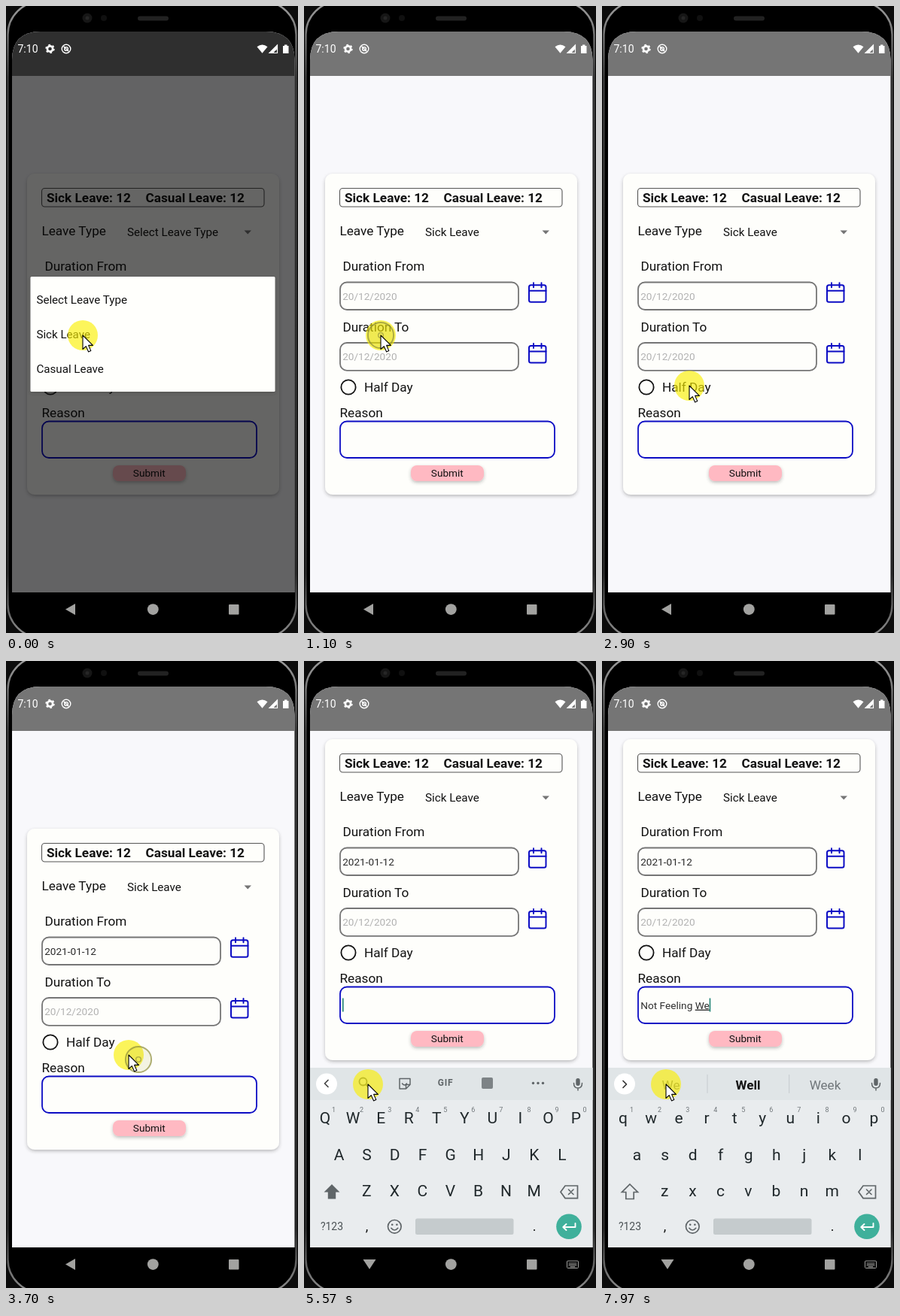
Animation, 388 px wide and 834 px high, one loop 8 s. Source, as an HTML page:

```html
<!DOCTYPE html>
<html lang="en">
<head>
<meta charset="utf-8">
<title>Leave request form</title>
<style>
html, body { margin: 0; width: 100%; height: 100%; overflow: hidden; background: #000; }
svg { display: block; width: 388px; height: 834px; }
text { font-family: Roboto, Arial, sans-serif; white-space: pre; fill: #121212; }
.mid { text-anchor: middle; }
.line { fill: none; stroke-linecap: round; stroke-linejoin: round; }
</style>
</head>
<body>
<svg id="stage" viewBox="0 0 388 834"></svg>
<script>
const LOOP = 8000;
const SHIFT = -119;
const GRAY = '#757575', BLUE = '#0c0cc4', KEY = '#20282b', ICON = '#5f6568', NAV = '#a2a2a0', HINT = '#70767a';

// ---- markup helpers ----
const text = (x, y, size, str, more = '') =>
  `<text x="${x}" y="${y}" font-size="${size}" ${more}>${str}</text>`;
const mid = (x, y, size, str, more = '') => text(x, y, size, str, 'class="mid" ' + more);
const box = (x, y, w, h, r, more) =>
  `<rect x="${x}" y="${y}" width="${w}" height="${h}" rx="${r}" ${more}/>`;
const dot = (x, y, r, more) => `<circle cx="${x}" cy="${y}" r="${r}" ${more}/>`;
const fill = c => `fill="${c}"`;
const ink = c => `style="fill:${c}"`;
const line = (c, w) => `fill="none" stroke="${c}" stroke-width="${w}"`;
const path = (d, more) => `<path d="${d}" ${more}/>`;
const stroke = (d, c, w) => path(d, `class="line" stroke="${c}" stroke-width="${w}"`);
const group = (id, body, more = '') => `<g id="${id}" ${more}>${body}</g>`;

// ---- parts ----
const defs = () => `<defs>
  <filter id="soft" x="-20%" y="-20%" width="140%" height="150%">
    <feDropShadow dx="0" dy="2" stdDeviation="2.2" flood-color="#303030" flood-opacity=".32"/></filter>
  <linearGradient id="rim" x2="0" y2="1">
    <stop stop-color="#a0a0a0"/><stop offset=".12" stop-color="#3c3c3c"/>
    <stop offset=".9" stop-color="#2c2c2c"/><stop offset="1" stop-color="#909090"/></linearGradient>
  <clipPath id="screen"><path d="M8 780V72Q8 34 46 34H345Q383.5 34 383.5 72V780Z"/></clipPath></defs>`;

const phone = () =>
  box(0, 0, 388, 834, 0, fill('#0c0c0c')) +
  box(2.5, -6, 383, 846, 44, 'fill="#000" stroke="url(#rim)" stroke-width="2.4"') +
  box(175, 13.5, 41, 6, 3, fill('#222')) +
  dot(108, 16, 6.5, fill('#161616')) + dot(108, 16, 2.5, fill('#262626')) +
  dot(130, 16, 4, fill('#101010'));

const calendar = y =>
  box(299, y + 3, 22.5, 22.5, 2.5, line(BLUE, 2)) +
  stroke(`M299 ${y + 10.5}H321.5M305 ${y}v6M315.5 ${y}v6`, BLUE, 2);

const card = () =>
  box(28, 223, 335, 427, 10, 'fill="#fefefb" filter="url(#soft)"') +
  box(47.5, 242.5, 295.5, 24.5, 4, line('#555', 1.1)) +
  text(54, 261, 17.2, 'Sick Leave: 12', 'font-weight="700"') +
  text(185.5, 261, 17.2, 'Casual Leave: 12', 'font-weight="700"') +
  text(47.5, 304.8, 17.2, 'Leave Type') +
  text(161, 306.4, 15.2, '', 'id="type"') +
  path('M316.5 298.5h9.5l-4.75 5z', fill(GRAY)) +
  text(51.5, 352, 17.2, 'Duration From') +
  box(48, 367.5, 237, 36.5, 9, line(GRAY, 1.8)) +
  text(51.2, 390.8, 13.6, '', 'id="from"') + calendar(368.2) +
  text(51.5, 432.8, 17.2, 'Duration To') +
  box(48, 448, 237, 36.8, 9, line(GRAY, 1.8)) +
  text(51.2, 471.4, 13.6, '20/12/2020', ink('#b2b2b2')) + calendar(448.9) +
  dot(59, 507, 9.6, line('#121212', 1.8)) +
  text(80, 513.2, 17.2, 'Half Day') +
  text(47.5, 546.8, 17.2, 'Reason') +
  box(48, 552.5, 285, 48.5, 9, line(BLUE, 1.8)) +
  text(51.2, 581.6, 13.66, '<tspan id="done"></tspan><tspan id="word" text-decoration="underline"></tspan>',
    'id="reason" ' + ink('#303030')) +
  box(0, 567.5, 1.6, 18, 0, 'id="caret" fill="#1f8273"') +
  box(142, 611, 97, 21, 8, 'fill="#ffb9c2" filter="url(#soft)"') +
  mid(190.3, 626.2, 13.6, 'Submit');

const status = () =>
  text(15.5, 62.4, 14, '7:10', ink('#fff')) +
  dot(58.5, 57, 3.6, line('#fff', 2.6)) +
  dot(58.5, 57, 5.4, line('#fff', 1.6) + ' stroke-dasharray="2.6 3.05"') +
  dot(80, 57, 5.8, line('#fff', 1.4)) + dot(80, 57, 2.4, line('#fff', 1.4)) +
  stroke('M77 54l6 6', '#fff', 1.2) +
  path('M333.5 54.2q7-5.4 14 0l-7 8.6z', fill('#fff')) +
  path('M360.5 52v10.5h-10.5z', line('#fff', 1.2)) +
  path('M360.5 52v5l-5.5 5.5h-5z', fill('#fff')) +
  path('M368 53h2v-1.5h3.5V53h2v10h-7.5z', fill('#fff'));

const dialog = () =>
  box(32.5, 360, 325, 153, 1.5, 'fill="#fffffc" filter="url(#soft)"') +
  ['Select Leave Type', 'Sick Leave', 'Casual Leave']
    .map((s, i) => text(40.4, 396.4 + 45.9 * i, 15.15, s)).join('');

const nav = () =>
  group('back', path('M79 802.5l13-7.5v15z', fill(NAV))) +
  group('hide', path('M78.5 796h17l-8.5 13z', fill(NAV)) +
    box(349.5, 798, 15, 9.5, 1, line(NAV, 1)) +
    stroke('M352 801h10M352 803.3h10M354 805.6h6', NAV, 1.2)) +
  dot(195.3, 802.6, 7.4, fill(NAV)) + box(296, 796, 13.5, 13.5, 1, fill(NAV));

const letters = (id, upper) => group(id, [
  ['qwertyuiop', 28, 615.2], ['asdfghjkl', 46.5, 663.6], ['zxcvbnm', 83.3, 711.8]
].map(([row, x, y]) => [...row].map((c, i) =>
  mid(x + 37.05 * i, y, 21, upper ? c.toUpperCase() : c, ink(KEY))).join('')).join('') +
  path('M37 696l10.5 10.5h-5.3v9h-10.4v-9h-5.3z', upper ? fill(ICON) : line(ICON, 1.7)));

const mic = () =>
  box(361.3, 555, 5.4, 10, 2.7, fill(ICON)) +
  stroke('M358.5 561.5q0 6.5 5.5 6.5t5.5-6.5M364 568v3', ICON, 1.5);

const tools = () => group('tools',
  stroke('M32 557.5l-4.5 4.5 4.5 4.5', '#444', 1.7) +
  dot(78.5, 559.5, 5, line(ICON, 1.8)) + stroke('M82.5 563.5l5 5', ICON, 2) +
  stroke('M127 555.5h14v8l-5.5 5.5h-8.5zM141 563.5h-5.5v5.5M130.5 562q3 4 6 0', ICON, 1.5) +
  mid(188, 565.2, 12, 'GIF', 'font-weight="700" letter-spacing=".8" ' + ink(ICON)) +
  box(236, 554, 15, 15, 2, fill('#7d8386')) +
  [304.5, 311, 317.5].map(x => dot(x, 561.5, 1.7, fill(ICON))).join(''));

const hints = () => group('hints',
  stroke('M28 558.5l4.5 4.5-4.5 4.5', '#333', 1.7) +
  stroke('M140 550.5v24M248.7 550.5v24', '#c6cbce', 1) +
  mid(91.5, 569.6, 17.1, '', 'id="h0" ' + ink(HINT)) +
  mid(194, 569.6, 17.1, '', 'id="h1" font-weight="700"') +
  mid(296.5, 569.6, 17.1, '', 'id="h2" ' + ink(HINT)));

const keyboard = () =>
  box(8, 541, 375.5, 239, 0, fill('#e9ecee')) +
  box(8, 541, 375.5, 43, 0, fill('#e0e5e7')) +
  dot(30, 562.6, 14, fill('#fff')) + tools() + hints() + mic() +
  [...'1234567890'].map((c, i) => mid(39.6 + 37.05 * i, 600, 9, c, ink(HINT))).join('') +
  letters('upper', true) + letters('lower', false) +
  path('M341 706.3l6-8.3h16.5v16.6H347z', line(ICON, 1.7)) +
  stroke('M351.5 703l6.5 6.5M358 703l-6.5 6.5', ICON, 1.6) +
  mid(37, 757, 14, '?123', ink('#4a5154')) +
  mid(83.5, 758, 18, ',') + mid(306, 758, 18, '.') +
  dot(120.3, 752.3, 8.8, line(ICON, 1.7)) +
  dot(117.2, 749.8, 1.3, fill(ICON)) + dot(123.4, 749.8, 1.3, fill(ICON)) +
  stroke('M115.8 754.3q4.5 5.5 9 0', ICON, 1.6) +
  box(148, 741.5, 130.5, 21.5, 2.5, fill('#c5cbcd')) +
  dot(352, 752.3, 16.8, fill('#3fb09b')) +
  stroke('M360.5 748v5h-16M348.5 749l-4.2 4 4.2 4', '#fff', 1.9);

const arrow = () =>
  path('M0 0V18.5L4.3 14.6L7.6 22L10.8 20.6L7.6 13.4H13.4Z',
    'fill="#fff" stroke="#000" stroke-width="1.1" stroke-linejoin="round"');

document.getElementById('stage').innerHTML =
  defs() + phone() +
  group('view',
    box(8, 34, 376, 746, 0, fill('#f8f8fb')) + group('card', card()) +
    box(8, 34, 376, 59, 0, fill(GRAY)) +
    group('scrim', box(8, 34, 376, 746, 0, 'fill="#000" opacity=".6"')),
    'clip-path="url(#screen)"') +
  status() + nav() + group('dialog', dialog()) + group('keys', keyboard()) +
  group('glow', dot(0, 0, 20, 'fill="#fbf000" opacity=".64"')) +
  group('ring',
    dot(0, 0, 1, 'id="wave" fill="#96961e" fill-opacity=".16" stroke="#8c8c38" stroke-width="2"') +
    dot(0, 0, 3.4, line('#8c8c38', 1.3))) +
  group('arrow', arrow());

// ---- timeline ----
const OPEN = 4560, READY = 4700, PICKED = 3560;
const MOVES = [
  [0, 102, 438], [1770, 102, 438], [2232, 312, 380], [2840, 312, 380], [2900, 116, 505],
  [3070, 116, 505], [3480, 176, 530], [3620, 176, 530], [3700, 163, 524],
  [3870, 130, 543], [3900, 130, 543], [4300, 85, 563], [LOOP, 85, 563]
];
const CLICKS = [[930, 102, 438], [2330, 312, 380], [3530, 176, 530], [4540, 85, 563]];
const PHRASE = 'Not Feeling We';
const TYPED = [...PHRASE].map((c, i) => i ? 6770 + 92 * (i - 1) : 6120);
const HINTS = {
  N: ['No', 'Not'], No: ['Not', 'Now'], Not: ['Note', 'Nothing'],
  F: ['For', 'From'], Fe: ['Few', 'Feel'], Fee: ['Feel', 'Feet'], Feel: ['Feeling', 'Feels'],
  Feeli: ['Feeling', 'Feelings'], Feelin: ['Feeling', 'Feelings'], Feeling: ['Feelings', 'Feel'],
  W: ['We', 'Well'], We: ['Well', 'Week']
};

const $ = id => document.getElementById(id);
const clamp = v => Math.max(0, Math.min(1, v));
const ease = p => (1 - Math.cos(Math.PI * p)) / 2;
const show = (id, on) => $(id).setAttribute('display', on ? 'inline' : 'none');
const alpha = (id, v) => $(id).setAttribute('opacity', v);
const move = (id, x, y) => $(id).setAttribute('transform', `translate(${x} ${y})`);
const put = (id, s) => { if ($(id).textContent !== s) $(id).textContent = s; };

function pointerAt(t) {
  const i = Math.max(1, MOVES.findIndex(m => m[0] > t));
  const [t0, x0, y0] = MOVES[i - 1], [t1, x1, y1] = MOVES[i];
  const p = ease(clamp((t - t0) / (t1 - t0)));
  return [x0 + (x1 - x0) * p, y0 + (y1 - y0) * p];
}

function drawPointer(t) {
  const at = pointerAt(t);
  move('glow', ...at);
  move('arrow', ...at);
  const hit = CLICKS.find(c => t >= c[0] && t < c[0] + 420);
  show('ring', hit);
  if (!hit) return;
  const age = t - hit[0];
  move('ring', hit[1], hit[2]);
  $('wave').setAttribute('r', Math.min(18, age / 10));
  alpha('ring', 0.7 * (1 - clamp((age - 170) / 250)));
}

function drawReason(t) {
  const n = TYPED.filter(k => k <= t).length;
  const str = PHRASE.slice(0, n), cut = str.lastIndexOf(' ') + 1;
  put('done', str.slice(0, cut));
  put('word', str.slice(cut));
  const since = t - (n ? TYPED[n - 1] : OPEN);
  show('caret', since >= 0 && since % 1000 < 500);
  $('caret').setAttribute('x', 51 + (n ? $('reason').getComputedTextLength() : 0));
  show('tools', !n);
  show('hints', n);
  show('upper', !n);
  show('lower', n);
  if (!n) return;
  const word = str.trim().split(' ').pop();
  [word, ...HINTS[word]].forEach((s, i) => put('h' + i, s));
}

function render(t) {
  const fade = 1 - clamp((t - 930) / 140);
  alpha('scrim', fade);
  alpha('dialog', fade);
  put('type', t < 950 ? 'Select Leave Type' : 'Sick Leave');

  const picked = t >= PICKED;
  put('from', picked ? '2021-01-12' : '20/12/2020');
  $('from').style.fill = picked ? '#2a2a2a' : '#b2b2b2';

  const up = t >= OPEN, p = clamp((t - OPEN) / (READY - OPEN));
  move('card', 0, up ? SHIFT : 0);
  show('back', !up);
  show('hide', up);
  show('keys', up);
  move('keys', 0, 60 * (1 - p));
  alpha('keys', clamp(p * 1.15));

  drawReason(t);
  drawPointer(t);
}

const start = performance.now();
function tick() {
  render((performance.now() - start) % LOOP);
  requestAnimationFrame(tick);
}
tick();
</script>
</body>
</html>
```
